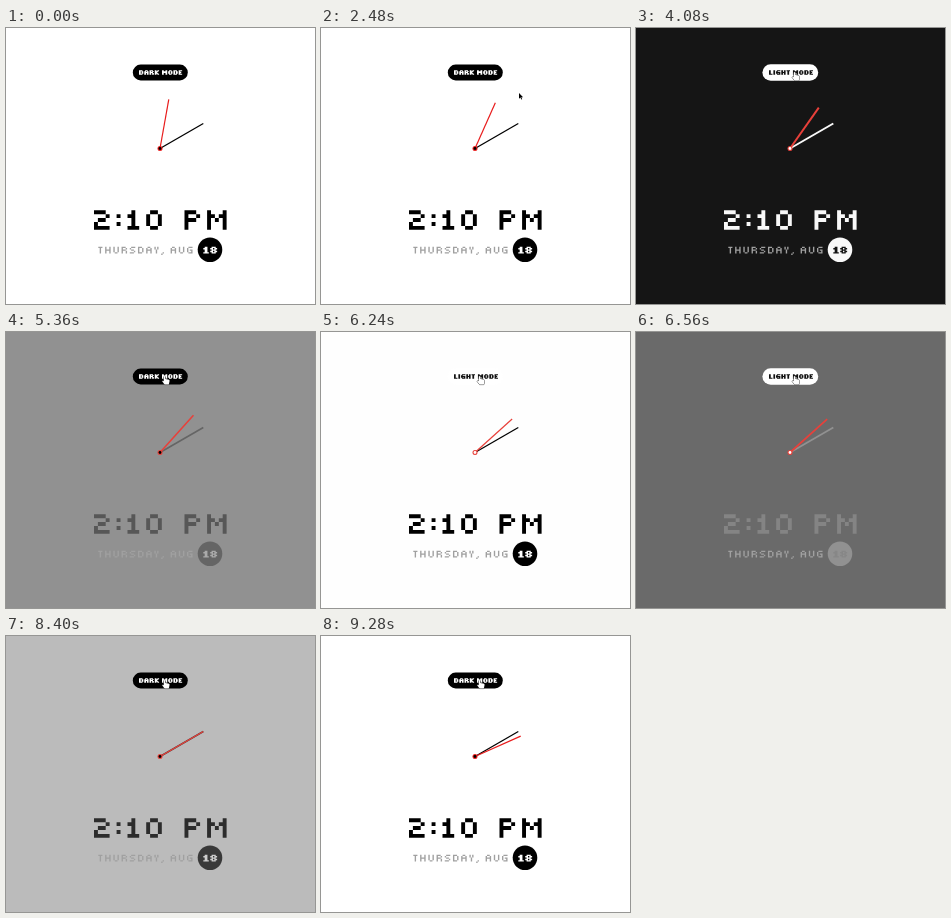
An HTML page with a canvas that plays this animation: 309x276 px, repeating every 9.36 s.

```html
<!DOCTYPE html>
<html lang="en">
<head>
<meta charset="utf-8">
<title>Theme clock</title>
<style>
html, body { margin: 0; width: 100%; height: 100%; overflow: hidden; background: #fff; }
canvas { display: block; }
</style>
</head>
<body>
<canvas id="stage" width="309" height="276" role="img" aria-label="Dark mode. 2:10 PM. Thursday, Aug 18"></canvas>
<script>
const ctx = document.getElementById('stage').getContext('2d');
const LOOP = 9360;
const FADE = 900;
const CLICKS = [3340, 5080, 6235, 8020];
const CENTER = { x: 154, y: 120.5 };

// Block lettering: each stroke is x1 y1 x2 y2 on a grid five rows high.
const GLYPHS = {
  '0': '0103 3133 1020 1424',
  '1': '1014 0101 0424',
  '2': '0020 3131 1222 0303 0434',
  '8': '1020 0101 3131 1222 0303 3333 1424',
  ':': '0101 0303',
  ',': '1414 0505',
  A: '0104 3134 1020 1222',
  D: '0004 1020 1424 3133',
  E: '0004 1020 1212 1424',
  G: '1030 0103 2232 3333 1434',
  H: '0004 3034 1222',
  I: '0004',
  K: '0004 3030 2121 1212 2323 3434',
  L: '0004 1424',
  M: '0004 4044 1111 3131 2222',
  O: '0103 3133 1020 1424',
  P: '0004 1020 3131 1222',
  R: '0004 1020 3131 1222 3334',
  S: '1030 0101 1222 3333 0424',
  T: '0020 1114',
  U: '0003 3033 1424',
  Y: '0001 2021 1214'
};
const WIDTHS = { ':': 1, ',': 2, '1': 3, E: 3, I: 1, L: 3, M: 5, T: 3, Y: 3 };

const clamp = v => Math.max(0, Math.min(1, v));
const mix = (a, b, k) => a + (b - a) * k;
const gray = v => { const n = Math.round(v); return `rgb(${n},${n},${n})`; };
const smooth = k => k * k * (3 - 2 * k);

// The CSS "ease" curve, solved by bisection.
function ease(x) {
  x = clamp(x);
  if (x === 0 || x === 1) return x;
  const curve = (s, a, b) => 3 * (1 - s) * (1 - s) * s * a + 3 * (1 - s) * s * s * b + s * s * s;
  let lo = 0, hi = 1;
  for (let i = 0; i < 24; i++) {
    const mid = (lo + hi) / 2;
    if (curve(mid, 0.25, 0.25) < x) lo = mid; else hi = mid;
  }
  return curve(lo, 0.1, 1);
}

function blockText(text, x, y, { cell, gap, space = 2, bold = 0, color }) {
  ctx.fillStyle = color;
  ctx.beginPath();
  for (const c of text) {
    if (c === ' ') { x += space * cell + gap; continue; }
    for (const stroke of GLYPHS[c].split(' ')) {
      const [x1, y1, x2, y2] = [...stroke].map(Number);
      ctx.rect(x + x1 * cell, y + y1 * cell, (x2 - x1 + 1 + bold) * cell, (y2 - y1 + 1) * cell);
    }
    x += ((WIDTHS[c] || 4) + bold) * cell + gap;
  }
  ctx.fill();
}

function disc(x, y, r, color) {
  ctx.fillStyle = color;
  ctx.beginPath();
  ctx.arc(x, y, r, 0, Math.PI * 2);
  ctx.fill();
}

function needle(degrees, length, width, color) {
  const a = degrees * Math.PI / 180;
  ctx.strokeStyle = color;
  ctx.lineWidth = width;
  ctx.beginPath();
  ctx.moveTo(CENTER.x, CENTER.y);
  ctx.lineTo(CENTER.x + Math.sin(a) * length, CENTER.y - Math.cos(a) * length);
  ctx.stroke();
}

// Lightness runs from 0 (dark theme) to 1 (light theme).
function theme(t) {
  let dark = false, light = 1;
  for (const click of CLICKS) {
    if (t < click) break;
    dark = !dark;
    const k = ease((t - click) / FADE);
    light = dark ? 1 - k : k;
  }
  return { dark, light };
}

function secondAngle(t) {
  const n = Math.floor((t + 200) / 1000);
  return 6 + 6 * n + 6 * ease((t + 200 - n * 1000) / 500);
}

const PATH = [
  [400, 259, 178], [719, 259, 178], [720, 249, 176], [1760, 199, 107],
  [2320, 198, 65], [2500, 198, 65], [3120, 158, 44]
];

function pointerAt(t) {
  if (t < PATH[0][0]) return null;
  for (let i = 1; i < PATH.length; i++) {
    const [t0, x0, y0] = PATH[i - 1], [t1, x1, y1] = PATH[i];
    if (t < t1) {
      const k = smooth((t - t0) / (t1 - t0));
      return { x: mix(x0, x1, k), y: mix(y0, y1, k) };
    }
  }
  const last = PATH[PATH.length - 1];
  return { x: last[1], y: last[2] };
}

const ARROW = new Path2D('M0 0V5.8L1.4 4.6L2.3 6.6L3.2 6.2L2.3 4.3H4.1Z');
const HAND = new Path2D('M-.2 .6Q.6-.5 1.3.6V3L5 3.8Q5.6 4 5.5 5L4.8 8.6H.6L-1.8 5.3Q-1.7 4.2-.2 5.2Z');

function pointer(t) {
  const p = pointerAt(t);
  if (!p) return;
  const over = p.x < 182 && p.y < 52;
  ctx.save();
  ctx.translate(p.x, p.y);
  ctx.lineWidth = 0.8;
  ctx.strokeStyle = over ? '#222' : '#fff';
  ctx.fillStyle = over ? '#fff' : '#000';
  const shape = over ? HAND : ARROW;
  ctx.stroke(shape);
  ctx.fill(shape);
  ctx.restore();
}

function button(dark) {
  const grow = dark ? 0.4 : 0;
  ctx.fillStyle = dark ? '#fff' : '#000';
  ctx.beginPath();
  ctx.roundRect(126.8 - grow, 36.6 - grow, 55 + 2 * grow, 15.8 + 2 * grow, 7.9 + grow);
  ctx.fill();
  blockText(dark ? 'LIGHT MODE' : 'DARK MODE', 133, 42.3, {
    cell: 0.87, gap: 0.9, space: 1.3, bold: 1, color: dark ? '#111' : '#fff'
  });
}

function draw(t) {
  const { dark, light } = theme(t);
  const ink = gray(255 * Math.pow(1 - light, 1.4));
  const solid = gray(255 * Math.pow(1 - light, 1.2));
  const badge = gray(255 * Math.pow(light, 0.65));
  const red = dark || light < 0.9 ? '#e8403a' : '#e81c1c';

  ctx.fillStyle = gray(mix(17, 255, light));
  ctx.fillRect(0, 0, 309, 276);

  button(dark);

  needle(60, 50, mix(2, 1.3, light), solid);
  needle(secondAngle(t), 50, mix(2, 1.2, light), red);
  disc(CENTER.x, CENTER.y, 2.5, red);
  disc(CENTER.x, CENTER.y, 1.4, dark ? '#fff' : '#000');

  blockText('2:10 PM', 88, 182.3, { cell: 3.9, gap: 7, space: 2.23, color: ink });
  blockText('THURSDAY, AUG', 92.3, 218.7, { cell: 1.38, gap: 2.69, space: 0.9, color: '#a0a0a0' });
  disc(204, 221.8, 12.3, solid);
  blockText('18', 197.3, 218.7, { cell: 1.38, gap: 1.4, bold: 1, color: badge });

  pointer(t);
}

const start = performance.now();
function tick() {
  draw((performance.now() - start) % LOOP);
  requestAnimationFrame(tick);
}
tick();
</script>
</body>
</html>
```
